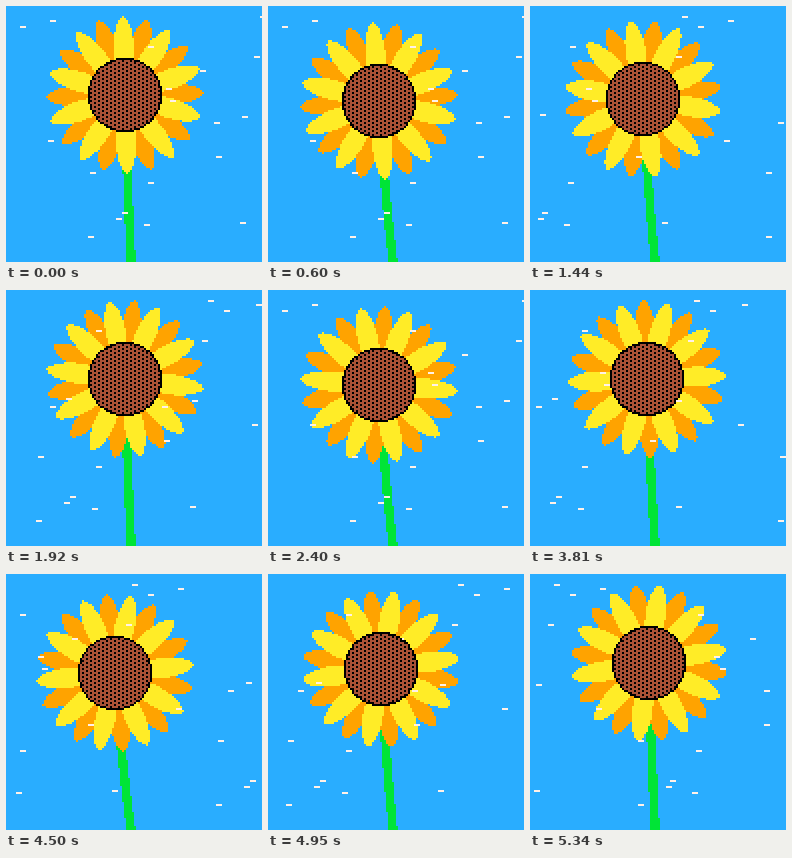
An HTML page with a canvas for the animation above (5.37 s loop, 256 px wide and 256 px high).

```html
<!DOCTYPE html>
<html>
<head>
<meta charset="utf-8">
<title>Sunflower in the wind</title>
<style>
html, body { margin: 0; width: 100%; height: 100%; overflow: hidden; background: #29adff; }
canvas { display: block; width: 100vw; height: 100vh; image-rendering: pixelated; }
</style>
</head>
<body>
<canvas id="stage" width="128" height="128"></canvas>
<script>
const SIZE = 128, STEP = 30, STEPS = 179;
const SKY = '#29adff', GREEN = '#00e436', ORANGE = '#ffa300', YELLOW = '#ffec27';
const WHITE = '#fff1e8', BROWN = '#ab5236', BLACK = '#000';
const TAU = Math.PI * 2, PETAL_GAP = TAU / 10;
const DISK = 18, REACH = 41, STEM_BASE = 62.6, STREAKS = 21;

const ctx = document.getElementById('stage').getContext('2d');

function dot(color, x, y, w = 1, h = 1) {
  ctx.fillStyle = color;
  ctx.fillRect(x, y, w, h);
}

// Calls visit(dx, dy) for every pixel of a square around the centre.
function around(reach, visit) {
  for (let dy = -reach; dy <= reach; dy++) {
    for (let dx = -reach; dx <= reach; dx++) visit(dx, dy);
  }
}

// Repeatable random number from 0 to 1
function random(seed) {
  const v = Math.sin(seed * 12.9898) * 43758.5453;
  return v - Math.floor(v);
}

// Is the offset (dx, dy) on one of ten petals, the first one at angle `turn`?
function onPetal(dx, dy, turn) {
  const angle = Math.atan2(dy, dx) - turn;
  const off = angle - Math.round(angle / PETAL_GAP) * PETAL_GAP;
  const r = Math.hypot(dx, dy);
  const u = (r * Math.cos(off) - 24) / 15.4;
  return Math.abs(u) <= 1 && Math.abs(r * Math.sin(off)) <= 5 * (1 - u * u) ** 0.6;
}

// The stem bows slightly towards the side the head leans to.
function drawStem(cx, cy) {
  for (let y = cy; y < SIZE; y++) {
    const s = (SIZE - y) / (SIZE - cy);
    const x = STEM_BASE + (cx + 0.5 - STEM_BASE) * s * (1.35 - 0.35 * s);
    const left = Math.round(x - 2.2);
    dot(GREEN, left, y, Math.round(x + 2.2) - left);
  }
}

function drawPetals(cx, cy, turn) {
  around(REACH, (dx, dy) => {
    if (onPetal(dx, dy, turn)) dot(YELLOW, cx + dx, cy + dy);
    else if (onPetal(dx, dy, turn + PETAL_GAP / 2)) dot(ORANGE, cx + dx, cy + dy);
  });
}

function drawWind(n) {
  for (let i = 1; i <= STREAKS; i++) {
    const x = (random(i) + 1 - n % 20 / 20) % 1;
    const y = 2 + 114 * random(i + 100);
    dot(WHITE, Math.floor(x * SIZE), Math.floor(y), 3);
  }
}

const inDisk = (dx, dy) => dx * dx + dy * dy <= DISK * (DISK + 1);

// Brown disk with a dark rim and staggered seeds
function drawDisk(cx, cy) {
  around(DISK, (dx, dy) => {
    if (!inDisk(dx, dy)) return;
    const x = cx + dx, y = cy + dy;
    const rim = !inDisk(Math.abs(dx) + 1, dy) || !inDisk(dx, Math.abs(dy) + 1);
    const seed = (x + 2 * y) % 4 === 0;
    dot(rim || seed ? BLACK : BROWN, x, y);
  });
}

function draw(n) {
  const sway = 2.6 * Math.cos(TAU * (n - 2) / 60);
  const cx = Math.floor(56.65 + sway), cy = Math.floor(47 - sway);
  const turn = -(91.5 + 0.15 * n) * TAU / 360;

  dot(SKY, 0, 0, SIZE, SIZE);
  drawStem(cx, cy);
  drawPetals(cx, cy, turn);
  drawWind(n);
  drawDisk(cx, cy);
}

const start = performance.now();
let last = -1;
function tick() {
  const n = Math.floor((performance.now() - start) / STEP) % STEPS;
  if (n !== last) draw(last = n);
  requestAnimationFrame(tick);
}
tick();
</script>
</body>
</html>
```
